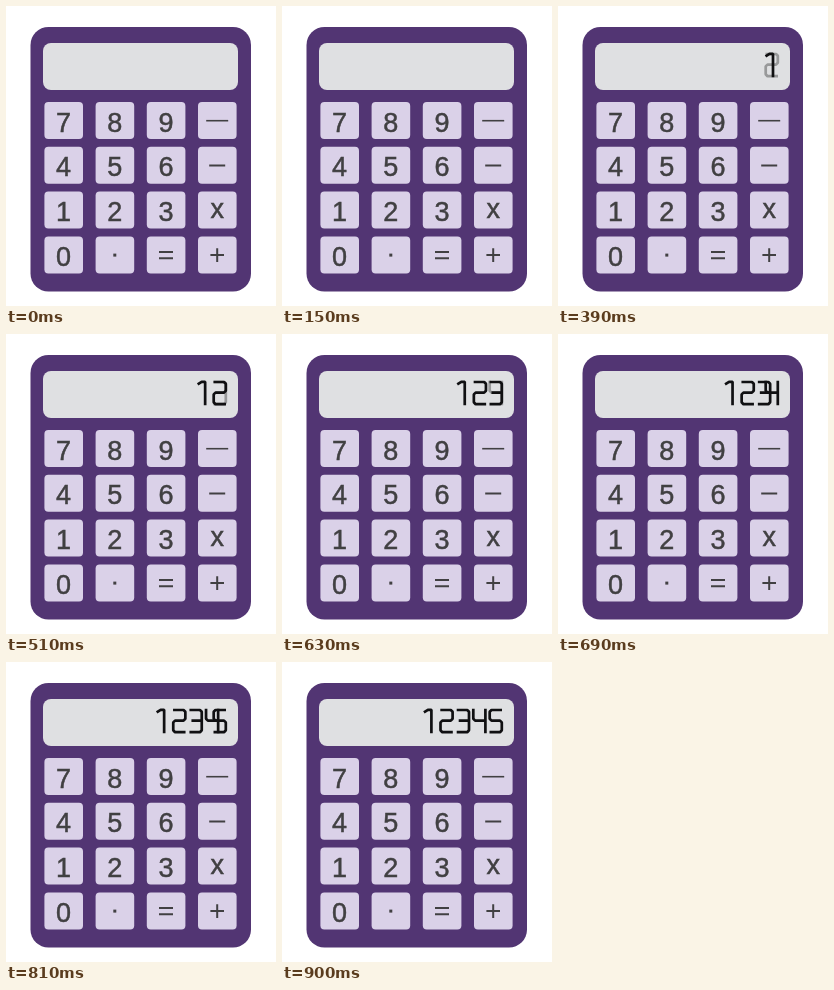
An HTML page for the animation above (1170 ms loop, 270 by 300 pixels).

```html
<!DOCTYPE html>
<html lang="en">
<head>
<meta charset="utf-8">
<title>Calculator</title>
<style>
  html, body { margin: 0; width: 100%; height: 100%; overflow: hidden; background: #fff; }
  svg { display: block; width: 270px; height: 300px; }
  text { font: 27px "Liberation Sans", Arial, sans-serif; fill: #414042; stroke: #414042; stroke-width: .5; text-anchor: middle; }
  .sign { fill: none; stroke: #414042; stroke-width: 2; }
  .lcd { fill: none; stroke: #101012; stroke-width: 2.7; stroke-linejoin: bevel; }
</style>
</head>
<body>
<svg viewBox="0 0 270 300">
  <rect x="24.5" y="21" width="220.5" height="264.5" rx="18" fill="#523573"/>
  <rect x="37" y="37" width="195" height="47" rx="8" fill="#dfe0e2"/>
  <g id="keys"></g>
  <g id="number" class="lcd"></g>
</svg>
<script>
const LOOP = 1170, STEP = 120, FIRST = 240, PITCH = 16.4, SLIDE_END = 875;
const $ = id => document.getElementById(id);
const clamp = v => Math.max(0, Math.min(1, v));

function add(parent, tag, attrs, text = "") {
  const el = document.createElementNS("http://www.w3.org/2000/svg", tag);
  for (const k in attrs) el.setAttribute(k, attrs[k]);
  el.textContent = text;
  parent.append(el);
  return el;
}

// Operator strokes, relative to the key centre
const signs = {
  "÷": "M-11 0H11",
  "-": "M-8 0H8",
  "+": "M-6.8 0H6.8M0 -6.8V6.8",
  "=": "M-7 -3.2H7M-7 3.2H7",
  ".": "M-1.5 0H1.5"
};

["789÷", "456-", "123x", "0.=+"].forEach((row, r) => [...row].forEach((label, c) => {
  const x = 38.4 + 51.2 * c, y = 96 + 44.8 * r, cx = x + 19.2;
  add($("keys"), "rect", { x, y, width: 38.6, height: 37, rx: 4, fill: "#dad1e8" });
  if (signs[label]) {
    add($("keys"), "path", {
      class: "sign", d: signs[label], transform: `translate(${cx} ${y + 18.7})`,
      "stroke-width": 2, style: label === "." ? "stroke-width:3" : label === "÷" ? "stroke-width:1.6" : ""
    });
  } else {
    add($("keys"), "text", { x: cx, y: y + (label === "x" ? 26 : 29.5) }, label);
  }
}));

// Display digits in a 12.5 by 23.5 cell
const glyphs = [
  "M0 3.5L4 1H7.5V24.5",
  "M0 1.2H10.5L12.3 3V10L10.5 11.8H2L.2 13.6V21.5L2 23.4H12.5",
  "M0 1.2H10.5L12.3 3V21.5L10.5 23.4H0M2 11.8H12",
  "M.2 0V10L2 11.8H12.3M12.3 0V24.5",
  "M12.5 1.2H2L.2 3V10L2 11.8H10.5L12.3 13.6V21.5L10.5 23.4H0"
];
const digits = glyphs.map((d, i) => add($("number"), "path", {
  d, transform: `translate(${207.5 - (4 - i) * PITCH} 46.8)`
}));

function draw(now) {
  const t = now % LOOP;
  const slots = 4 * clamp((SLIDE_END - t) / (4 * STEP));
  digits.forEach((el, i) => {
    // A new digit stays in the last slot until the row reaches it
    const x = Math.min(207.5, 207.5 + (slots - 4 + i) * PITCH);
    el.setAttribute("transform", `translate(${x} 46.8)`);
    el.setAttribute("opacity", clamp((t - FIRST - STEP * i) / 90));
  });
}

const start = performance.now();
function tick() {
  draw(performance.now() - start);
  requestAnimationFrame(tick);
}
tick();
</script>
</body>
</html>
```
